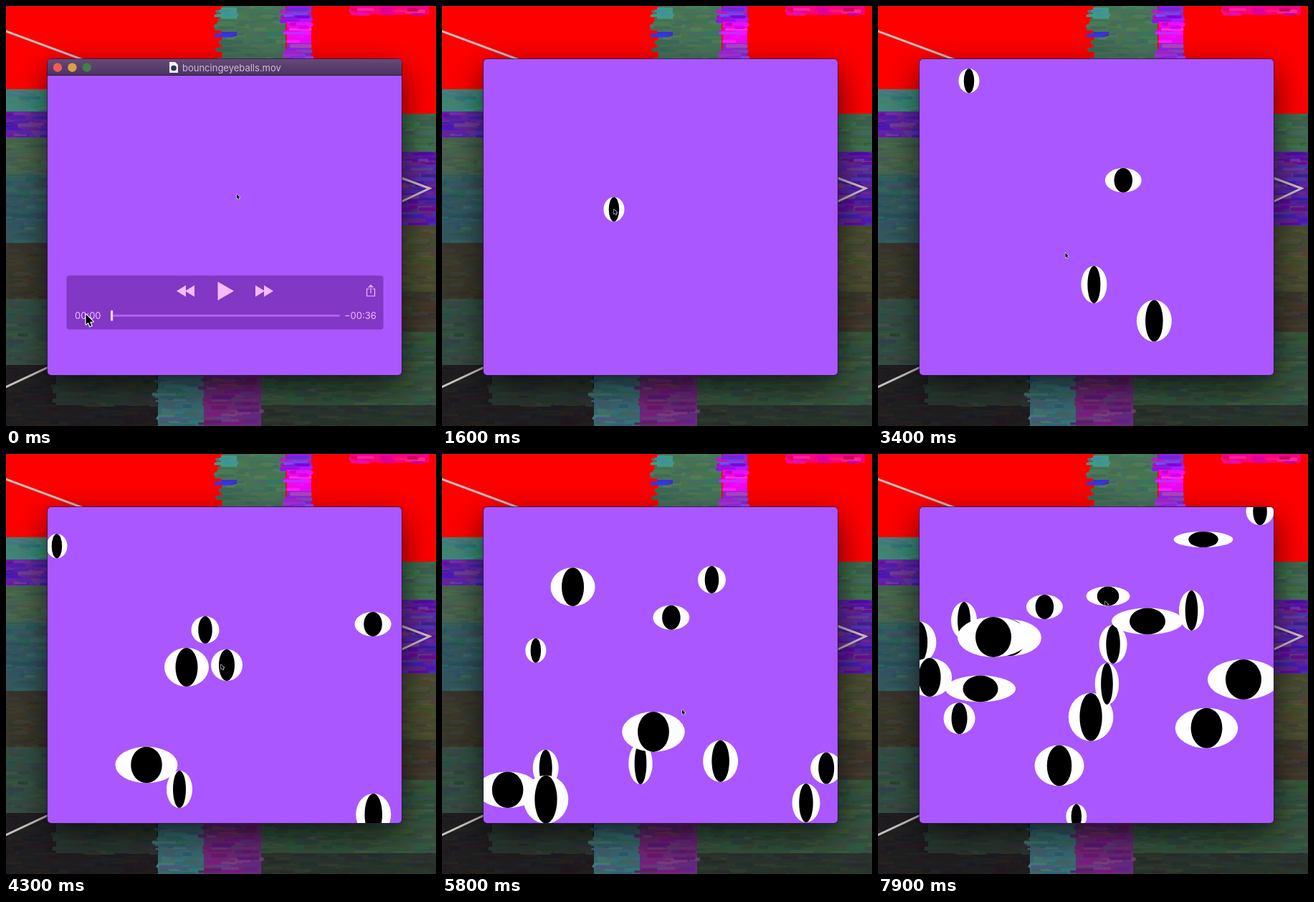
Animation, 600 px wide and 585 px high, one loop 8 s. Source, as an HTML page with a canvas:

```html
<!DOCTYPE html>
<html lang="en">
<head>
<meta charset="utf-8">
<title>Bouncing eyeballs</title>
<style>
html, body { margin: 0; width: 100%; height: 100%; overflow: hidden; background: #222; }
canvas { display: block; }
</style>
</head>
<body>
<canvas id="stage" width="600" height="585"></canvas>
<script>
const W = 600, H = 585, LOOP = 8000, STEP = 100;
const ctx = document.getElementById('stage').getContext('2d');
const WIN = [58, 74, 494, 440, 5];
const PINK = '#f5baff';

let seed = 11;
const rnd = () => (seed = (seed * 16807) % 2147483647) / 2147483647;
const lerp = (a, b, p) => a + (b - a) * p;
const clamp = p => Math.max(0, Math.min(1, p));
const smooth = p => (p = clamp(p)) * p * (3 - 2 * p);

// Value at v along rows of [key, ...values]
function along(rows, v) {
  let i = 1;
  while (i < rows.length - 1 && rows[i][0] < v) i++;
  const a = rows[i - 1], b = rows[i];
  const p = clamp((v - a[0]) / (b[0] - a[0]));
  return a.slice(1).map((n, j) => lerp(n, b[j + 1], p));
}

// Bounce v between two walls
function fold(v, lo, hi) {
  const d = hi - lo, m = (((v - lo) % (2 * d)) + 2 * d) % (2 * d);
  return lo + (m > d ? 2 * d - m : m);
}

// ---- eyes, timed by the video clock
const CLOCK = [[0, -2.5], [2500, 0], [4300, 1.77], [5800, 3.22], [6900, 4.46], [7900, 5.526]];
const eyes = [];

// At moment `at` the eyes are at x, y; the first is `age` old, each next one `gap` younger
function spawn(at, age, gap, ...list) {
  list.forEach(([x, y, vx, vy, rx, ry], i) => {
    const a = age - i * gap;
    eyes.push({ born: at - a, x: x - vx * a, y: y - vy * a, vx, vy, rx, ry });
  });
}
spawn(0, .9, .5,
  [183, 193, -63.3, -100.2, 14.5, 17],
  [258, 375, 143.9, 71.8, 24.5, 29]);
spawn(1.77, 1.4, .27,
  [242, 467, -67.1, 89.2, 18, 26],
  [512, 237, 191.8, -6.4, 25.5, 17],
  [196, 433, -72, 91.9, 43.5, 25.3],
  [278, 245, 67.9, -48.2, 19.5, 19],
  [252, 297, -47.9, -233.2, 31, 27],
  [308, 294, 183.3, 99, 22, 22]);
spawn(3.22, 1.4, .35,
  [508, 486, 118.8, 122.7, 19.5, 27],
  [145, 481, -144, 81, 31.3, 33.5],
  [277, 431, 18.4, 122.7, 16.7, 29],
  [295, 387, 70.9, 115, 43.8, 28]);
spawn(4.46, 1.22, .24,
  [127, 102, -167, -199.8, 50, 28],
  [388, 289, 46.4, -66.6, 17.5, 28],
  [446, 338, 144.5, -22.5, 50, 28],
  [306, 377, -49.7, 53.5, 34.5, 28.5]);
spawn(5.526, .95, .3,
  [143, 327, -152, 68, 49, 18.5],
  [454, 119, 223, -173, 41.5, 11],
  [376, 233, 213, 70, 50, 18.5],
  [321, 198, 90, -60, 30.5, 13.5]);

// The pointer inside the video visits each place where an eye is born
const trail = [
  [-2.5, 322, 262], [-1.2, 322, 262], [0, 332, 344], [1.77, 300, 293],
  [3.22, 335, 356], [4.46, 287, 262], [5.526, 317, 205],
  ...eyes.map(e => [e.born, e.x, e.y])
].sort((a, b) => a[0] - b[0]);

// ---- drawing helpers
function rounded(g, x, y, w, h, r) {
  g.beginPath();
  g.roundRect(x, y, w, h, r);
}

function poly(color, ...pts) {
  ctx.beginPath();
  pts.forEach(([x, y]) => ctx.lineTo(x, y));
  ctx.closePath();
  ctx.fillStyle = color;
  ctx.fill();
}

function oval(color, x, y, rx, ry) {
  ctx.beginPath();
  ctx.ellipse(x, y, rx, ry, 0, 0, 7);
  ctx.fillStyle = color;
  ctx.fill();
}

function text(str, x, y, color) {
  ctx.font = '13px Inter, "Liberation Sans", sans-serif';
  ctx.fillStyle = color;
  ctx.fillText(str, x, y);
}

function pointer(x, y, size) {
  ctx.save();
  ctx.translate(x, y);
  ctx.scale(size, size);
  ctx.lineJoin = 'round';
  ctx.lineWidth = 2.4;
  ctx.strokeStyle = '#fff';
  ctx.beginPath();
  [[0, 0], [0, 15], [3.5, 12], [6, 18], [8.6, 17], [6.1, 11], [11, 11]]
    .forEach(([px, py]) => ctx.lineTo(px, py));
  ctx.closePath();
  ctx.stroke();
  ctx.fillStyle = '#000';
  ctx.fill();
  ctx.restore();
}

// ---- desktop: patches of short smears, more varied where the colour is vivid
function smear(g, x, y, w, h, color) {
  const rgb = color.match(/\w\w/g).map(c => parseInt(c, 16));
  const spread = 12 + (Math.max(...rgb) - Math.min(...rgb)) * .35;
  g.fillStyle = color;
  g.fillRect(x, y, w, h);
  g.lineCap = 'round';
  for (let n = w * h / 75; n > 0; n--) {
    const len = 6 + rnd() * 24;
    const px = x - 8 + rnd() * (w + 10 - len), py = y + 2 + rnd() * (h - 2);
    g.lineWidth = 3 + rnd() * 3;
    g.strokeStyle = `rgb(${rgb.map(c => c + (rnd() - .5) * spread).join()})`;
    g.beginPath();
    g.moveTo(px, py);
    g.lineTo(px + len, py);
    g.stroke();
  }
}

// Stacked patches, each reaching down to the next
function column(g, x, w, end, ...bands) {
  bands.forEach(([y, color], i) =>
    smear(g, x, y, w, (i + 1 < bands.length ? bands[i + 1][0] : end) - y, color));
}

function makeDesktop() {
  const c = document.createElement('canvas');
  c.width = W;
  c.height = H;
  const g = c.getContext('2d');
  g.fillStyle = '#ff0000';
  g.fillRect(0, 0, W, H);
  column(g, 0, 90, 510, [116, '#3e8678'], [147, '#6224a5'], [183, '#46624e'],
    [235, '#32585e'], [330, '#3a362c'], [408, '#344c42']);
  column(g, 0, 215, H, [500, '#211e21']);
  column(g, 70, 140, 556, [514, '#2c3832']);
  column(g, 302, 88, 80, [0, '#467458']);
  column(g, 300, 22, 42, [2, '#46968a'], [18, '#467458'], [36, '#3c32c8']);
  column(g, 392, 34, 76, [0, '#961ee1'], [22, '#eb0af0'], [52, '#8a28dc']);
  column(g, 480, 110, 12, [0, '#f50082']);
  column(g, 540, 70, 454, [150, '#3e684e'], [203, '#5c22a0'], [306, '#484a32'], [398, '#3e3a2c']);
  column(g, 355, 255, H, [454, '#36523e'], [556, '#2a342d']);
  column(g, 212, 66, H, [510, '#3a6a72']);
  column(g, 276, 80, H, [510, '#6c2a78']);

  g.strokeStyle = '#c9bfc0';
  g.lineWidth = 3;
  g.lineCap = 'butt';
  g.beginPath();
  g.moveTo(-3, 34);
  g.lineTo(591, 254);
  g.lineTo(-3, 532);
  g.stroke();

  g.shadowColor = 'rgba(0,0,0,.7)';
  g.shadowBlur = 46;
  g.shadowOffsetY = 17;
  g.fillStyle = '#aa57ff';
  rounded(g, ...WIN);
  g.fill();
  g.shadowColor = 'transparent';
  g.strokeStyle = '#2c1745';
  g.lineWidth = 1.5;
  g.stroke();
  g.fill();
  return c;
}
const desktop = makeDesktop();

// ---- player parts
function titleBar() {
  const shade = ctx.createLinearGradient(0, 74, 0, 97);
  shade.addColorStop(0, '#654a78');
  shade.addColorStop(1, '#4a3260');
  ctx.fillStyle = shade;
  ctx.fillRect(58, 74, 494, 22);
  ctx.fillStyle = '#281638';
  ctx.fillRect(58, 96, 494, 1);
  ['#f45a50', '#dda044', '#3f8046'].forEach((c, i) => oval(c, 72 + i * 20.4, 85.7, 6.2, 6.2));
  poly('#f1edf4', [228, 78], [236, 78], [240, 82], [240, 93], [228, 93]);
  oval('#26345e', 234, 86.5, 3.8, 3.8);
  text('bouncingeyeballs.mov', 246, 90.5, '#cdbdd4');
}

function wedge(x, y, w, h) {
  poly(PINK, [x, y - h], [x + w, y], [x, y + h]);
}

function controls() {
  ctx.fillStyle = '#8237c5';
  rounded(ctx, 84.5, 375.5, 442, 75, 4);
  ctx.fill();
  [263, 251].forEach(x => wedge(x, 397, -13, 8));
  wedge(295.5, 397, 22.5, 13);
  [348, 360].forEach(x => wedge(x, 397, 13, 8));

  ctx.strokeStyle = PINK;
  ctx.lineWidth = 1.2;
  ctx.stroke(new Path2D('M506.5 394h-3v10h11v-10h-3M509 400v-11M505.8 392l3.2-3.2 3.2 3.2'));

  text('00:00', 96, 436, PINK);
  text('−00:36', 472, 436, PINK);
  ctx.fillStyle = '#b460ec';
  rounded(ctx, 149, 429.7, 317, 3, 1.5);
  ctx.fill();
  ctx.fillStyle = '#ffdcff';
  rounded(ctx, 146, 424, 3.2, 14.5, 1);
  ctx.fill();
}

function draw(t) {
  const [u] = along(CLOCK, t);
  ctx.drawImage(desktop, 0, 0);

  ctx.save();
  rounded(ctx, ...WIN);
  ctx.clip();
  for (const e of eyes) {
    const age = u - e.born;
    if (age < 0) continue;
    const x = fold(e.x + e.vx * age, 55, 555);
    const y = fold(e.y + e.vy * age, 72, 517);
    oval('#fefdff', x, y, e.rx, e.ry);
    oval('#000', x, y, e.rx / 2, e.ry);
  }
  pointer(...along(trail, u), .43);

  ctx.globalAlpha = 1 - clamp((t - 1200) / 300);
  if (ctx.globalAlpha > 0) {
    titleBar();
    controls();
  }
  ctx.restore();

  if (t < 1400) {
    const p = smooth((t - 100) / 700);
    pointer(lerp(111.5, 309.5, p), lerp(429.5, 407.5, p), .93);
  }
}

const start = performance.now();
function tick() {
  const t = (performance.now() - start) % LOOP;
  draw(Math.floor(t / STEP) * STEP);
  requestAnimationFrame(tick);
}
tick();
</script>
</body>
</html>
```
